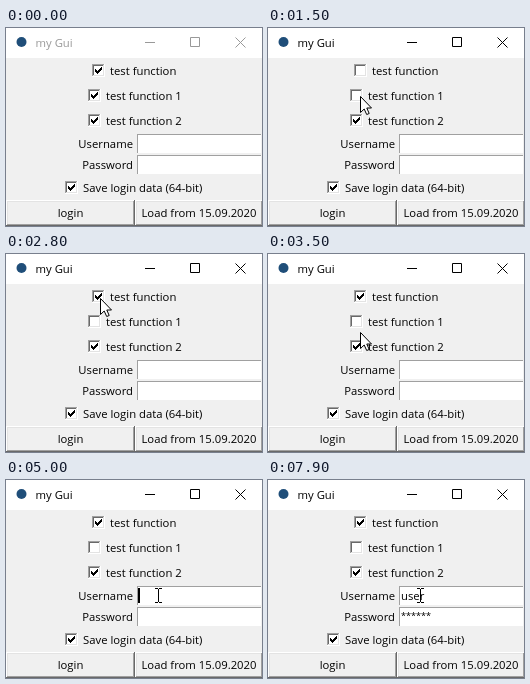
Write an HTML page that moves like this. It is 256 px wide and 198 px high and loops after 8000 ms.

```html
<!DOCTYPE html>
<html lang="en">
<head>
<meta charset="utf-8">
<title>my Gui</title>
<style>
  html, body { margin: 0; width: 256px; height: 198px; overflow: hidden; background: #f0f0f0; }
  svg { display: block; }
  text { font: 11.3px "Open Sans", "Noto Sans", sans-serif; white-space: pre; }
  rect { shape-rendering: crispEdges; }
  #stars { font-size: 9.1px; }
</style>
</head>
<body>
<svg id="stage" width="256" height="198" viewBox="0 0 256 198"></svg>
<script>
const LOOP = 8000, STEP = 100;
const RAISED = ['#fff', '#e3e3e3', '#696969', '#a0a0a0'];
const SUNKEN = ['#a0a0a0', '#696969', '#fff', '#e3e3e3'];

const rect = (x, y, w, h, fill) =>
  `<rect x="${x}" y="${y}" width="${w}" height="${h}" fill="${fill}"/>`;
const text = (x, y, s, extra = '') => `<text x="${x}" y="${y}" ${extra}>${s}</text>`;

// Two-pixel 3D border around a filled face
const bevel = (x, y, w, h, [tl, tlIn, br, brIn], face) =>
  rect(x, y, w, h, br) + rect(x, y, w - 1, h - 1, tl) +
  rect(x + 1, y + 1, w - 2, h - 2, brIn) + rect(x + 1, y + 1, w - 3, h - 3, tlIn) +
  rect(x + 2, y + 2, w - 4, h - 4, face);

const tick = (x, y) =>
  [2, 3, 4, 3, 2, 1, 0].map((dy, i) => rect(x + i, y + dy, 1, 3, '#000')).join('');
const check = (x, y, label, id) =>
  bevel(x, y, 13, 13, SUNKEN, '#fff') +
  `<g id="${id}">${tick(x + 3, y + 3)}</g>` + text(x + 18, y + 11, label);
const button = (x, w, label) =>
  bevel(x, 172, w, 26, RAISED, '#f0f0f0') +
  text(x + w / 2, 189, label, 'text-anchor="middle"');
const entry = (y, label) =>
  rect(131, y, 124, 19, '#a0a0a0') + rect(132, y + 1, 123, 18, '#fff') +
  text(127, y + 14, label, 'text-anchor="end"');

const $ = id => document.getElementById(id);
$('stage').innerHTML =
  rect(0, 0, 256, 30, '#fff') +
  '<circle cx="15.5" cy="14" r="5" fill="#1f4e79"/>' +
  `<g id="title">${text(29.5, 18.5, 'my Gui')}${rect(139, 14, 10, 1, 'currentColor')}
    <path d="M184.5 9.5h9v9h-9zM229.5 9.5l10 10m0-10l-10 10" fill="none" stroke="currentColor"/></g>` +
  check(86, 36, 'test function', 'tick1') +
  check(82, 61, 'test function 1', 'tick2') +
  check(82, 86, 'test function 2', 'tick3') +
  entry(106, 'Username') + entry(127, 'Password') +
  check(59, 153, 'Save login data (64-bit)', 'tick4') +
  button(0, 129, 'login') + button(129, 128, 'Load from 15.09.2020') +
  text(133, 120, '', 'id="user"') + text(133, 139, '', 'id="stars"') +
  '<rect id="caret" width="2" height="15"/>' +
  `<g id="beam">${rect(0, -6, 1, 13, '#000')}${[-7, 7].map(y =>
    rect(-3, y, 3, 1, '#000') + rect(1, y, 3, 1, '#000')).join('')}</g>` +
  `<path id="arrow" d="M.5 .5V16.5L4.2 13L6.7 18.5L9.2 17.5L6.8 12H11.5Z"
    fill="#fff" stroke="#000"/>`;

// Pointer waypoints: time, x, y
const path = [
  [300, 146, -10], [500, 128, 12], [1000, 100, 46], [1200, 94, 44], [1400, 92, 68],
  [1500, 92, 68], [1700, 91, 90], [2000, 92, 85], [2300, 90, 88], [2800, 94, 44],
  [3100, 92, 50], [3500, 92, 78], [3700, 106, 88], [4000, 150, 111],
  [4200, 159, 114], [4400, 152, 115], [LOOP, 152, 115]
];
// Times at which each box is toggled, starting checked
const clicks = { tick1: [1200, 2800], tick2: [1500], tick3: [1800, 2300] };
const userKeys = [5600, 5700, 5900, 6300];
const starKeys = [6800, 7200, 7400, 7500, 7700, 7900];
const FOCUS_USER = 4000, FOCUS_PASS = 6400;

const count = (times, t) => times.filter(k => k <= t).length;
const show = (id, on) => $(id).setAttribute('visibility', on ? 'visible' : 'hidden');

function pointerAt(t) {
  const i = path.findIndex(p => p[0] > t);
  if (i < 1) return null;
  const [t0, x0, y0] = path[i - 1], [t1, x1, y1] = path[i];
  const k = (t - t0) / (t1 - t0);
  return [Math.round(x0 + (x1 - x0) * k), Math.round(y0 + (y1 - y0) * k)];
}

function draw(t) {
  const color = t < 500 ? '#999' : '#000';
  $('title').setAttribute('color', color);
  $('title').setAttribute('fill', color);
  for (const id in clicks) show(id, count(clicks[id], t) % 2 === 0);

  $('user').textContent = 'user'.slice(0, count(userKeys, t));
  $('stars').textContent = '*'.repeat(count(starKeys, t));

  const inPass = t >= FOCUS_PASS;
  const blink = inPass ? (t - FOCUS_PASS) % 900 : (t - FOCUS_USER) % 1000;
  const typed = $(inPass ? 'stars' : 'user');
  const width = typed.textContent ? typed.getComputedTextLength() : 0;
  $('caret').setAttribute('x', 132 + Math.round(width));
  $('caret').setAttribute('y', inPass ? 129 : 108);
  show('caret', t >= FOCUS_USER && blink < 600);

  const pos = pointerAt(t);
  const overEntry = pos && pos[0] > 130 && pos[1] > 106;
  show('arrow', pos && !overEntry);
  show('beam', overEntry);
  if (pos) $(overEntry ? 'beam' : 'arrow').setAttribute('transform', `translate(${pos})`);
}

const start = performance.now();
function frame() {
  const t = (performance.now() - start) % LOOP;
  draw(Math.floor(t / STEP) * STEP);
  requestAnimationFrame(frame);
}
frame();
</script>
</body>
</html>
```
